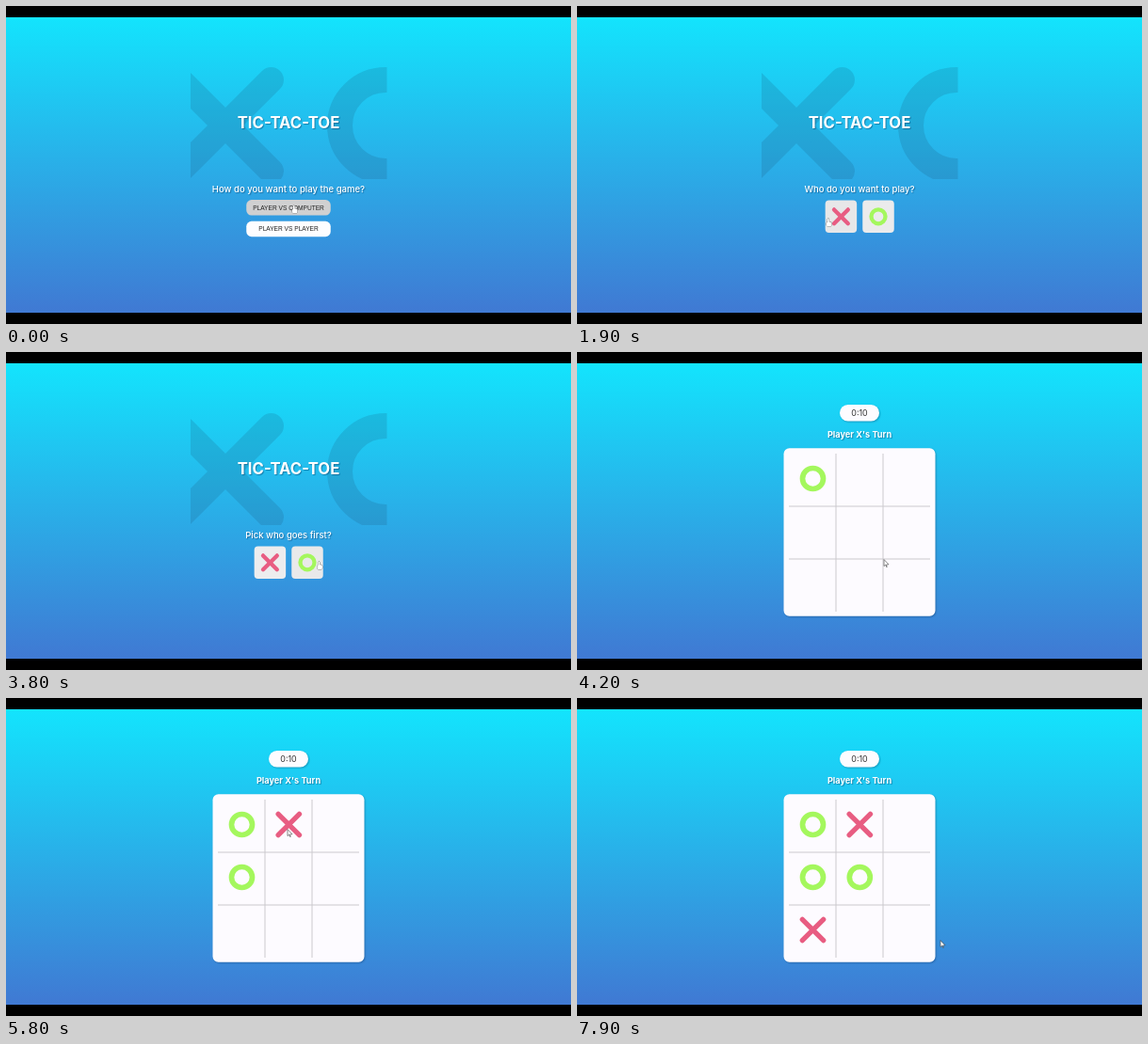
An HTML page with a canvas for the animation above (8000 ms loop, 600 px wide and 338 px high).

```html
<!DOCTYPE html>
<html lang="en">
<head>
<meta charset="utf-8">
<title>Tic-Tac-Toe</title>
<style>
html, body { margin: 0; width: 100%; height: 100%; overflow: hidden; background: #000; }
canvas { display: block; width: 100%; height: 100%; }
</style>
</head>
<body>
<canvas id="stage" width="600" height="338"></canvas>
<script>
const ctx = document.getElementById('stage').getContext('2d');
const LOOP = 8000, GAME_START = 4200, REPLY_DELAY = 300;
const SANS = 'Inter, "Open Sans", sans-serif';
const ARIAL = '"Liberation Sans", Arial, sans-serif';
const PINK = '#e85d82', GREEN = '#a4f75d';
const TOP = 12, BOTTOM = 326;

const point = (x, y) => ({ x, y });
const cell = (col, row) => point(250.5 + 49.8 * col, 134.5 + 56 * row);
const buttonX = point(280.4, 223.8), buttonO = point(320, 223.8);

// The player's clicks, each answered by the computer.
const turns = [
  { click: 5500, cell: cell(1, 0), reply: cell(0, 1) },
  { click: 7000, cell: cell(0, 2), reply: cell(1, 1) }
];
const marks = [{ at: GAME_START, mark: 'O', cell: cell(0, 0) }];
for (const turn of turns) {
  marks.push({ at: turn.click, mark: 'X', cell: turn.cell });
  marks.push({ at: turn.click + REPLY_DELAY, mark: 'O', cell: turn.reply });
}

const cursorHome = point(305, 212);
const glides = [
  { from: 900, to: 1500, target: point(410, 222) },
  { from: 1700, to: 1900, target: point(266, 226) },
  { from: 2400, to: 2600, target: point(340, 234) },
  { from: 2600, to: 2800, target: point(380, 239) },
  { from: 3400, to: 3900, target: point(326, 221) },
  { from: 4200, to: 4600, target: point(388, 236) },
  { from: 5000, to: 5400, target: point(299, 140) },
  { from: 5900, to: 6700, target: point(251, 246) },
  { from: 7000, to: 7400, target: point(386, 258) }
];

function cursorAt(t) {
  let { x, y } = cursorHome;
  for (const { from, to, target } of glides) {
    const p = Math.min(1, Math.max(0, (t - from) / (to - from)));
    const eased = p * p * (3 - 2 * p);
    x += (target.x - x) * eased;
    y += (target.y - y) * eased;
  }
  return point(x, y);
}

function isOver(button, t) {
  const { x, y } = cursorAt(t);
  return Math.abs(x - button.x) < 14.6 && Math.abs(y - button.y) < 17;
}

// The hover shade fades over 200 ms: average the recent past.
function hoverLevel(button, t) {
  let hits = 0;
  for (let lag = 0; lag < 200; lag += 20) hits += isOver(button, t - lag);
  return hits / 10;
}

function withShadow(alpha, blur, draw) {
  ctx.save();
  ctx.shadowColor = `rgba(0,30,70,${alpha})`;
  ctx.shadowOffsetX = ctx.shadowOffsetY = 1;
  ctx.shadowBlur = blur;
  draw();
  ctx.restore();
}

function text(string, y, size, weight, color = '#fff', family = SANS) {
  ctx.font = `${weight} ${size}px ${family}`;
  ctx.textAlign = 'center';
  ctx.fillStyle = color;
  ctx.fillText(string, 300, y);
}

function heading(string, y, size, weight) {
  withShadow(0.4, 1, () => text(string, y, size, weight));
}

function box(cx, cy, w, h, radius, color) {
  ctx.fillStyle = color;
  ctx.beginPath();
  ctx.roundRect(cx - w / 2, cy - h / 2, w, h, radius);
  ctx.fill();
}

function cross({ x, y }, reach, width, color) {
  ctx.strokeStyle = color;
  ctx.lineWidth = width;
  ctx.lineCap = 'round';
  ctx.beginPath();
  for (const side of [-1, 1]) {
    ctx.moveTo(x - reach, y - reach * side);
    ctx.lineTo(x + reach, y + reach * side);
  }
  ctx.stroke();
}

function ring({ x, y }, radius, width, color) {
  ctx.strokeStyle = color;
  ctx.lineWidth = width;
  ctx.beginPath();
  ctx.arc(x, y, radius, 0, Math.PI * 2);
  ctx.stroke();
}

function drawBackground() {
  const sky = ctx.createLinearGradient(0, TOP, 0, BOTTOM);
  sky.addColorStop(0, '#13e4fd');
  sky.addColorStop(1, '#4079d3');
  ctx.fillStyle = '#000';
  ctx.fillRect(0, 0, 600, 338);
  ctx.fillStyle = sky;
  ctx.fillRect(0, TOP, 600, BOTTOM - TOP);
}

function drawBackdropMarks() {
  const shade = 'rgba(28,75,105,0.17)';
  ctx.save();
  ctx.beginPath();
  ctx.rect(196, 64, 208.5, 120);
  ctx.clip();
  cross(point(233, 127), 48.5, 27, shade);
  ring(point(403, 127), 48.5, 27, shade);
  ctx.restore();
}

function drawPill(label, y, color) {
  box(300, y, 89.5, 16.4, 5.5, color);
  text(label, y + 2.2, 6.6, 400, '#222', ARIAL);
}

function drawChoice(button, t) {
  const level = Math.round(237 - 21 * hoverLevel(button, t));
  box(button.x, button.y, 33.5, 34.5, 4, `rgb(${level},${level},${level + 1})`);
}

function drawMenu(t) {
  drawBackdropMarks();
  heading('TIC-TAC-TOE', 130.3, 16.7, 700);
  if (t < 100) {
    heading('How do you want to play the game?', 198.3, 9.55, 500);
    drawPill('PLAYER VS COMPUTER', 214.3, '#d0d0d1');
    drawPill('PLAYER VS PLAYER', 237, '#fdfdff');
    return;
  }
  heading(t < 2300 ? 'Who do you want to play?' : 'Pick who goes first?', 198.3, 9.5, 500);
  drawChoice(buttonX, t);
  drawChoice(buttonO, t);
  cross(buttonX, 7.4, 4.3, PINK);
  ring(buttonO, 7.5, 4.3, GREEN);
}

function drawGame(t) {
  const played = marks.filter(({ at }) => at <= t);
  const last = played[played.length - 1];
  const seconds = 10 - Math.floor((t - last.at) / 1000);

  withShadow(0.3, 2, () => {
    box(300, 64.8, 42, 17.5, 8.75, '#fdfcff');
    box(300, 191.5, 161, 178.5, 6, '#fdfbff');
  });
  text('0:' + String(seconds).padStart(2, '0'), 68.3, 8.9, 400, '#333');
  heading(`Player ${last.mark === 'O' ? 'X' : 'O'}'s Turn`, 91.4, 9.2, 700);

  ctx.fillStyle = '#cbc9ce';
  for (const i of [0, 1]) {
    ctx.fillRect(274.5 + 50 * i, 108, 1, 168);
    ctx.fillRect(225, 163.5 + 56 * i, 150, 1);
  }
  for (const { mark, cell } of played) {
    if (mark === 'O') ring(cell, 11, 5.7, GREEN);
    else cross(cell, 11.2, 5.3, PINK);
  }
}

function drawHand() {
  ctx.beginPath();
  ctx.roundRect(0, 0, 1.6, 6, 0.8);
  ctx.roundRect(-1, 3.4, 5.4, 4.8, 1.5);
  ctx.stroke();
  ctx.fill();
}

function drawArrow() {
  ctx.beginPath();
  ctx.moveTo(0, 0);
  ctx.lineTo(0, 6.6);
  ctx.lineTo(1.6, 5.2);
  ctx.lineTo(3, 7.8);
  ctx.lineTo(2.6, 5);
  ctx.lineTo(4.6, 4.8);
  ctx.closePath();
  ctx.fill();
  ctx.stroke();
}

function drawCursor(t) {
  const { x, y } = cursorAt(t);
  const clickable = t < GAME_START && x < 345;
  ctx.save();
  ctx.translate(x, y);
  ctx.fillStyle = '#fff';
  ctx.strokeStyle = '#555';
  ctx.lineWidth = 0.7;
  if (clickable) drawHand();
  else drawArrow();
  ctx.restore();
}

function frame(now) {
  const t = now % LOOP;
  drawBackground();
  if (t < GAME_START) drawMenu(t);
  else drawGame(t);
  drawCursor(t);
  requestAnimationFrame(frame);
}
requestAnimationFrame(frame);
</script>
</body>
</html>
```
